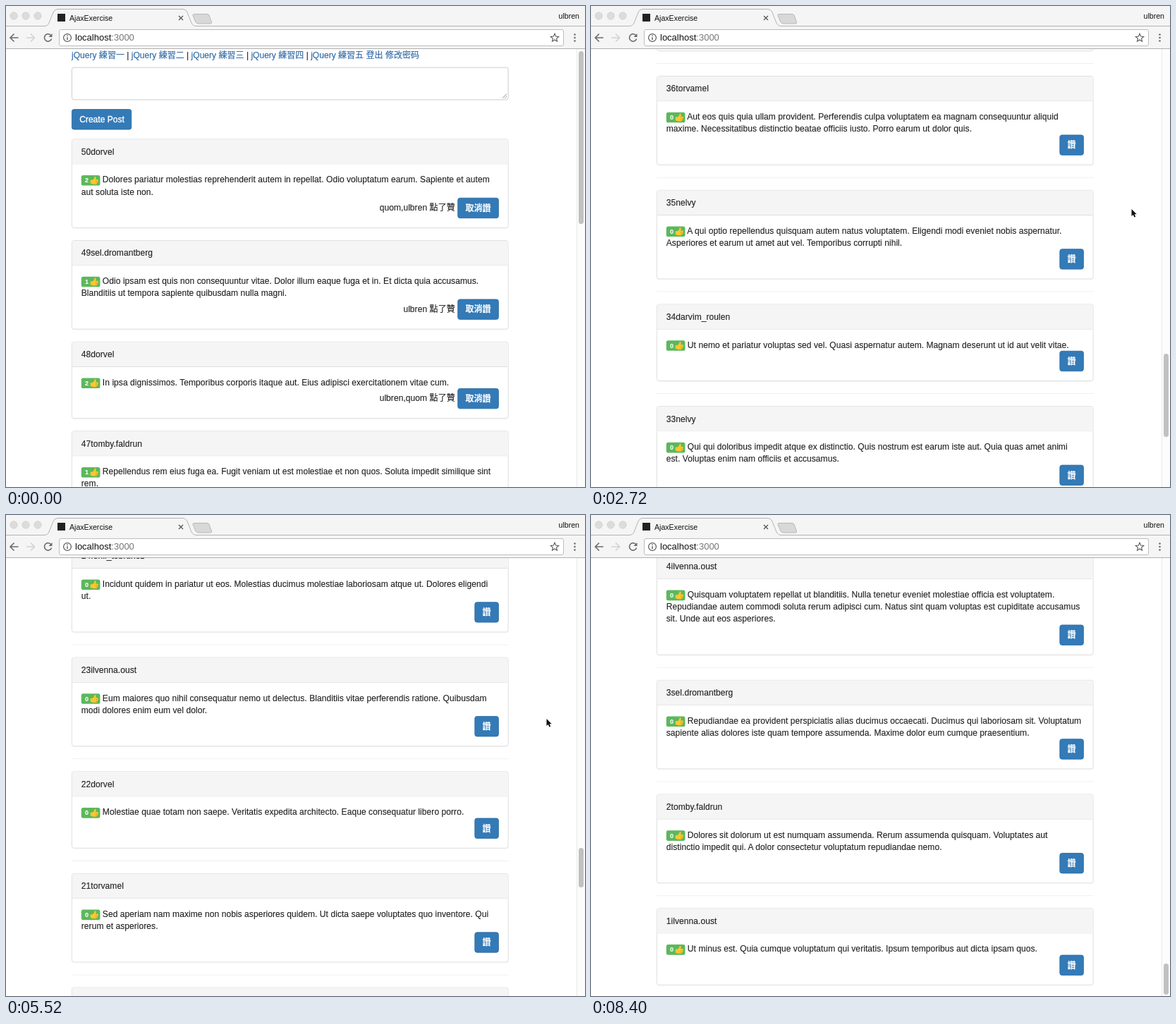
An HTML page for the animation above (9.52 s loop, 821 by 682 pixels).

```html
<!DOCTYPE html>
<html lang="zh-Hant">
<head>
<meta charset="utf-8">
<title>AjaxExercise</title>
<style>
html, body { margin: 0; width: 100%; height: 100%; overflow: hidden; background: #fff; }
body { position: relative; font-family: "Liberation Sans", "Noto Sans CJK TC", sans-serif; }
#view { position: absolute; top: 61px; left: 0; width: 821px; height: 621px; overflow: hidden; }
#content {
  position: absolute; left: 92.8px; top: 0; width: 720px; display: flow-root;
  transform-origin: 0 0; font-size: 14px; line-height: 20px; color: #222; white-space: pre;
  letter-spacing: .06px; -webkit-text-stroke: .15px;
}
#content * { box-sizing: border-box; }
#links { height: 20px; letter-spacing: 0; }
#links a { color: #2a66a5; }
#entry { position: relative; height: 54px; margin: 10px 0 15px; border: 1px solid #c4c4c4; border-radius: 4px; }
#entry svg { position: absolute; right: 1px; bottom: 1px; }
.btn {
  display: inline-block; height: 34px; padding: 6px 12px; vertical-align: top; line-height: 20px; letter-spacing: 0;
  color: #fff; background: #337ab7; border: 1px solid #2e6da4; border-radius: 4px; font-weight: bold;
}
#create { display: block; width: 99px; margin-bottom: 15px; font-weight: normal; -webkit-text-stroke: .4px #fff; }
.panel { margin-bottom: 20px; border: 1px solid #ddd; border-radius: 4px; box-shadow: 0 1px 1px rgba(0,0,0,.05); }
.heading { height: 41px; padding: 10px 15px; background: #f5f5f5; border-bottom: 1px solid #ddd; border-radius: 3px 3px 0 0; }
.body { padding: 15px; }
.actions { height: 34px; line-height: 33px; text-align: right; }
.like {
  display: inline-block; position: relative; top: 2.5px; width: 31px; height: 17px; padding-left: 6px;
  vertical-align: top; font-size: 10.5px; line-height: 17px; color: #fff; background: #5cb85c; border-radius: 3px;
}
.like svg { position: absolute; left: 14px; top: 1px; }
hr { margin: 20px 0; border: 0; border-top: 1px solid #eee; }
#track { position: absolute; left: 809px; top: 0; width: 12px; height: 621px; background: #fcfcfc; border-left: 1px solid #e8e8e8; box-sizing: border-box; }
#thumb { position: absolute; left: 812px; width: 7px; border-radius: 3.5px; background: #c1c1c1; }
#chrome, #cursor { position: absolute; left: 0; top: 0; }
</style>
</head>
<body>
<div id="view">
  <div id="content"></div>
  <div id="track"></div>
  <div id="thumb"></div>
</div>

<svg id="chrome" width="821" height="62" font-size="10.6" fill="none">
  <path d="M0 0H821V61H0Z" fill="#f5f5f5"/>
  <path d="M0 28.5H54Q59 28.5 61 24L67 9Q69 4.5 73 4.5H250Q255 4.5 257 9L263 24Q265 28.5 270 28.5H821" stroke="#b4b4b4"/>
  <path d="M0 60.5H821" stroke="#b0b0b0"/>
  <g fill="#dcdcdc" stroke="#cfcfcf" stroke-width=".7">
    <circle cx="11" cy="14" r="5.2"/><circle cx="28" cy="14" r="5.2"/><circle cx="45" cy="14" r="5.2"/>
  </g>
  <path d="M267 11.5H285Q287 11.5 288 13L291.5 23Q292 25 290 25H273Q270 25 269 23L265 13.5Q264.5 11.5 267 11.5Z" fill="#d8d8d8" stroke="#b8b8b8"/>
  <rect x="73" y="11" width="11" height="11" fill="#222"/>
  <path d="M245 14L251 20M251 14L245 20" stroke="#555" stroke-width="1.3"/>
  <text x="90" y="21" fill="#111">AjaxExercise</text>
  <text x="813" y="18" fill="#111" text-anchor="end">ulbren</text>
  <rect x="75.5" y="33.5" width="715" height="23" rx="2.5" fill="#fff" stroke="#bdbdbd"/>
  <g stroke-width="1.6">
    <path d="M17.5 45H6M11.5 39.5L6 45L11.5 50.5" stroke="#6c6c6c"/>
    <path d="M29 45H40.5M35 39.5L40.5 45L35 50.5" stroke="#d2d2d2"/>
    <path d="M64 42A5.2 5.2 0 1 0 64.6 46.5" stroke="#6c6c6c"/>
  </g>
  <path d="M65.5 39V44H60.5Z" fill="#6c6c6c"/>
  <circle cx="87" cy="45" r="5.4" stroke="#555" stroke-width="1.2"/>
  <path d="M87 44.2V48M87 41.5V43" stroke="#555" stroke-width="1.4"/>
  <text x="98" y="49" font-size="13" fill="#111">localhost<tspan fill="#777">:3000</tspan></text>
  <path d="M778 39.2L779.6 43.1 783.7 43.4 780.6 46.1 781.5 50.1 778 48 774.5 50.1 775.4 46.1 772.3 43.4 776.4 43.1Z" stroke="#555" stroke-width="1.1"/>
  <g fill="#6c6c6c"><circle cx="806.5" cy="40.5" r="1.3"/><circle cx="806.5" cy="45" r="1.3"/><circle cx="806.5" cy="49.5" r="1.3"/></g>
</svg>

<svg id="cursor" width="12" height="16" viewBox="-2 -2 12 16">
  <path d="M0 0V10L2.3 7.9 3.9 11.6 5.7 10.8 4.1 7.2H7.2Z" fill="#111" stroke="#fff" stroke-width="1.4" paint-order="stroke"/>
</svg>

<script>
const LOOP = 9520, STEP = 80, SCALE = 0.8605, VIEW = 621;
const ME = 'ulbren', FRIEND = 'quom';

const users = {
  a: 'ilvenna.oust', c: 'nelvy', h: 'sel.dromantberg', k: 'fenil_tobrunez', m: 'dorvel',
  o: 'torvamel', r: 'darvim_roulen', s: 'tumie', v: 'tomby.faldrun'
};
const likers = { 50: [FRIEND, ME], 49: [ME], 48: [ME, FRIEND], 47: [ME] };

// Newest post (50) first: user key, then the text; "|" breaks a line.
const posts = `m Dolores pariatur molestias reprehenderit autem in repellat. Odio voluptatum earum. Sapiente et autem|aut soluta iste non.
h Odio ipsam est quis non consequuntur vitae. Dolor illum eaque fuga et in. Et dicta quia accusamus.|Blanditiis ut tempora sapiente quibusdam nulla magni.
m In ipsa dignissimos. Temporibus corporis itaque aut. Eius adipisci exercitationem vitae cum.
v Repellendus rem eius fuga ea. Fugit veniam ut est molestiae et non quos. Soluta impedit similique sint|rem.
s Nemo quia dolorum sed. Officiis aut rerum voluptas et quod. Minima sunt tempore ut eveniet illo.|Quam sit nihil et debitis.
c Aliquam et fugiat omnis. Ratione sed iure dolores ut. Placeat quo natus voluptatem modi aut.|Dolorem eum vel libero.
r Quaerat sunt magni nobis. Et velit architecto ipsam quas. Nostrum ut earum dolor accusantium.|Tenetur aut hic.
o Vero adipisci placeat iusto enim. Debitis sit sapiente. Explicabo perferendis qui recusandae omnis|quibusdam.
h Consequuntur aut ab. Tempora cumque et magnam voluptas ab sunt. Cumque voluptate ea harum.|Inventore est in aut quam id. Suscipit quos ea delectus.
a Sit qui praesentium aliquid. Sed consequuntur sit. Corporis officia aspernatur assumenda. Ut cumque|qui itaque voluptates ut.
v Et qui qui. Corporis qui voluptates expedita. Alias enim harum voluptas accusantium. Placeat et itaque|sed quod expedita voluptates asperiores.
m Autem rerum et nihil. Quos dolore ipsum qui. Voluptatem sit eaque nam provident et molestias.|Ut officia non velit.
s Facere illum quo vitae. Esse aut similique dolorem. Quia tempora laborum et nostrum impedit ut.|Sint quasi omnis aut.
a Reiciendis ab odit neque. Iure et animi sed dolores. Harum quidem ut perspiciatis minus rerum.|Et sequi dolor.
o Aut eos quis quia ullam provident. Perferendis culpa voluptatem ea magnam consequuntur aliquid|maxime. Necessitatibus distinctio beatae officiis iusto. Porro earum ut dolor quis.
c A qui optio repellendus quisquam autem natus voluptatem. Eligendi modi eveniet nobis aspernatur.|Asperiores et earum ut amet aut vel. Temporibus corrupti nihil.
r Ut nemo et pariatur voluptas sed vel. Quasi aspernatur autem. Magnam deserunt ut id aut velit vitae.
c Qui qui doloribus impedit atque ex distinctio. Quis nostrum est earum iste aut. Quia quas amet animi|est. Voluptas enim nam officiis et accusamus.
k Dolor et saepe quia. Nulla aut velit ducimus. Molestiae sed eligendi ipsa voluptatibus rerum.|Aut quis modi tenetur.
v Beatae non fuga sit. Libero quas et tempore. Inventore ut doloribus aut mollitia cupiditate.|Omnis est nobis.
s Sunt cum amet illo. Ipsa repellat et voluptas. Deleniti aut quaerat nemo dolorum consequatur.|Id sed vero eos.
m Magni et culpa ut. Error quidem aut sapiente. Nihil eos iusto facilis voluptatem laboriosam.|Quo dicta harum.
h Veritatis consequatur illo quia ipsum quidem et. Aut fuga nostrum debitis incidunt et. Est non quia|blanditiis aliquam culpa. Animi quis dolores fugit recusandae adipisci. Voluptas recusandae est numquam|dicta soluta.
o Itaque nisi cupiditate deleniti labore tenetur. Fugiat alias eveniet temporibus ut. Voluptatem quaerat sunt|sint a ut. Sunt tempora dolor. Et ratione reiciendis.
m Temporibus cumque sed iusto. Exercitationem accusamus dolores soluta. Ea facilis sit quod id non.
a Non commodi eos minima dolorum error. Ab molestiae et omnis quia. Aliquid et mollitia voluptates|assumenda nam nihil. Sit sequi et quo reiciendis et.
k Incidunt quidem in pariatur ut eos. Molestias ducimus molestiae laboriosam atque ut. Dolores eligendi|ut.
a Eum maiores quo nihil consequatur nemo ut delectus. Blanditiis vitae perferendis ratione. Quibusdam|modi dolores enim eum vel dolor.
m Molestiae quae totam non saepe. Veritatis expedita architecto. Eaque consequatur libero porro.
o Sed aperiam nam maxime non nobis asperiores quidem. Ut dicta saepe voluptates quo inventore. Qui|rerum et asperiores.
c Quod ipsum et vitae. Ad numquam optio voluptas. Rerum aut dolore sit explicabo perferendis.|Est illo fugit ut.
v Animi sed quia natus. Omnis et labore tempora. Qui voluptatum aut hic architecto praesentium.|Non velit eos.
r Officia quo sint rem. Eveniet ut dolorem aliquam. Iste sunt et magnam voluptates consequatur.|Ab minima quis.
h Laborum enim aut quos. Sequi et facere nulla ipsam. Temporibus quia velit reprehenderit.
s Harum et nisi dolor. Quidem ut omnis voluptas. Alias rerum aut molestiae recusandae corrupti.|Sed vel quo iusto.
a Tempore sit eaque non. Porro et libero dicta. Accusamus quas ut doloremque similique nostrum.|Fuga aut modi.
m Ratione ea ullam quia. Illum et saepe nobis. Consequuntur aut dolores impedit voluptatem odio.|Ut culpa enim.
o Nam quis ut soluta. Autem et pariatur velit. Repellendus sit amet distinctio officiis facilis.
k Vitae aut error modi. Suscipit et earum quasi. Cupiditate quo sint exercitationem voluptatum.|Magni id ipsa.
c Atque et maxime quo. Nemo sit aut deserunt. Provident non eligendi tenetur voluptas occaecati.|Iure ut dolor.
v Esse quam et fugiat. Unde aut vero sapiente. Dolorum sed perspiciatis molestias ut laudantium.|Quas non rerum. Eos nihil et quaerat dolores. Sit aut ipsam voluptatibus omnis. Rerum nobis quia|ut magni.
h Minus sed quisquam. Incidunt ut temporibus qui. Voluptas eligendi, et quo repellat saepe nisi.
r Sint quidem minus totam vel error. Iste neque facilis et. Maxime eum tenetur nobis enim distinctio et|fuga. Occaecati neque saepe quo dolores.
o Earum consequuntur libero quasi repellendus sed. Eius laudantium qui ea facilis voluptas. Corporis|perspiciatis dicta.
s Quibusdam ab recusandae enim iste mollitia ad et. Dolorem tenetur doloremque. Aut ducimus dolores.|Consequatur impedit non aliquam nihil illo quo ipsa. Sit et omnis vitae excepturi.
m Aperiam sunt fuga et nemo. Voluptatem aut cumque illo molestiae. Quis expedita hic. Explicabo alias ut|dolores et magnam.
a Quisquam voluptatem repellat ut blanditiis. Nulla tenetur eveniet molestiae officia est voluptatem.|Repudiandae autem commodi soluta rerum adipisci cum. Natus sint quam voluptas est cupiditate accusamus|sit. Unde aut eos asperiores.
h Repudiandae ea provident perspiciatis alias ducimus occaecati. Ducimus qui laboriosam sit. Voluptatum|sapiente alias dolores iste quam tempore assumenda. Maxime dolor eum cumque praesentium.
v Dolores sit dolorum ut est numquam assumenda. Rerum assumenda quisquam. Voluptates aut|distinctio impedit qui. A dolor consectetur voluptatum repudiandae nemo.
a Ut minus est. Quia cumque voluptatum qui veritatis. Ipsum temporibus aut dicta ipsam quos.`.split('\n');

const thumbsUp = `<svg width="15" height="15" viewBox="0 0 15 15">
  <path d="M1 7L5 6.5Q8 4 8 1Q10.5 .5 10.3 3.5L9.8 6H13.5Q14.7 7 13.7 8.5Q14.3 9.8 13.2 10.5Q13.3 12 12 12.3Q11.5 13.8 10 13.8H6L1 12.5Z" fill="#fdc62f"/>
  <path d="M9.5 8.5H13.5M9.5 10.5H13M9.5 12.3H12" stroke="#e09a1c" stroke-width=".7"/></svg>`;

function panel(line, index) {
  const id = 50 - index, fans = likers[id] || [];
  const text = line.slice(2).replace(/\|/g, '\n');
  const action = fans.length ? `${fans.join(',')} 點了贊 <span class="btn">取消讚</span>` : '<span class="btn">讚</span>';
  return `${id <= 40 ? '<hr>' : ''}<div class="panel"><div class="heading">${id}${users[line[0]]}</div>` +
    `<div class="body"><div><b class="like">${fans.length}${thumbsUp}</b> ${text}</div>` +
    `<div class="actions">${action}</div></div></div>`;
}

const $ = id => document.getElementById(id);
const panels = posts.map(panel);
const exercises = [...'一二三四五'].map(n => `<a>jQuery 練習${n}</a>`).join(' | ');
$('content').innerHTML =
  `<div id="links">${exercises} <a>登出</a> <a>修改密码</a></div>` +
  '<div id="entry"><svg width="9" height="9"><path d="M1 8L8 1M5 8L8 5" stroke="#777"/></svg></div>' +
  '<span class="btn" id="create">Create Post</span>' +
  [0, 10, 20, 30, 40].map(i => `<div class="page">${panels.slice(i, i + 10).join('')}</div>`).join('');
const pages = [...document.querySelectorAll('.page')];

const pageLoads = [0, 1040, 3280, 5200, 6240];

// [time, scroll offset]: flicks separated by rests.
const scrollKeys = [
  [0, 0], [960, 926], [1680, 1099.5],
  [2080, 1099.5], [2240, 1500], [2320, 1500], [2560, 1990], [2640, 1990], [2720, 2174.3], [2800, 2330],
  [2880, 2330], [3120, 2527], [3680, 2527], [3840, 2990], [4000, 2990], [4160, 3462.7],
  [4320, 3462.7], [4560, 3760], [4640, 3760], [4800, 3990], [4880, 3990], [5040, 4127],
  [5440, 4127], [5520, 4157.6], [5600, 4620], [5680, 4620], [5840, 5200], [5920, 5200], [6080, 5710],
  [6160, 5710], [6640, 6400], [6800, 6400], [6880, 6590.5],
  [7120, 6590.5], [7280, 6880], [7440, 6880], [7600, 7150], [7760, 7150], [7840, 7326.4]
];

function scrollAt(time) {
  const next = scrollKeys.findIndex(key => key[0] > time);
  if (next < 0) return scrollKeys[scrollKeys.length - 1][1];
  const [t0, s0] = scrollKeys[next - 1], [t1, s1] = scrollKeys[next];
  return s0 + (s1 - s0) * (time - t0) / (t1 - t0);
}

function draw() {
  const time = Math.floor(performance.now() % LOOP / STEP) * STEP;
  const scroll = scrollAt(time);
  pages.forEach((page, i) => page.style.display = time >= pageLoads[i] ? 'block' : 'none');
  $('content').style.transform = `translateY(${-scroll}px) scale(${SCALE})`;

  const ratio = VIEW / ($('content').offsetHeight * SCALE);
  $('thumb').style.top = 3 + scroll * ratio + 'px';
  $('thumb').style.height = VIEW * ratio - 4.5 + 'px';

  $('cursor').style.display = time >= 80 && time < 8400 ? 'block' : 'none';
  $('cursor').style.transform = `translate(764.5px, ${time < 5520 ? 286 : 287}px)`;
  requestAnimationFrame(draw);
}
draw();
</script>
</body>
</html>
```
